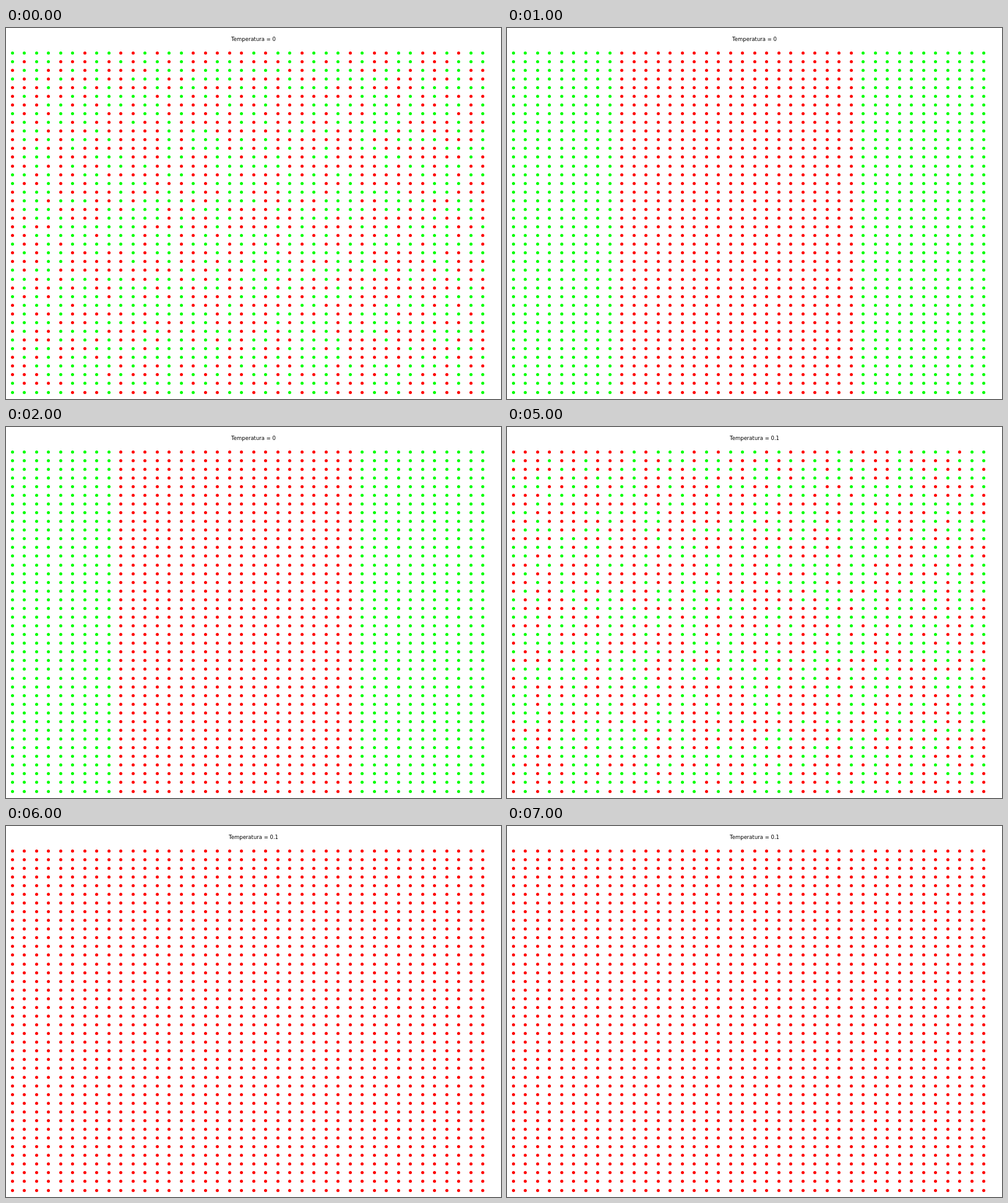
These frames come from a looping animation (800 px wide and 600 px high, 8 s). An HTML page with a canvas:

```html
<!DOCTYPE html>
<html lang="es">
<head>
<meta charset="utf-8">
<title>Temperatura</title>
<style>
  html, body { margin: 0; width: 100%; height: 100%; overflow: hidden; background: #fff; }
  canvas { display: block; }
</style>
</head>
<body>
<canvas id="stage" width="800" height="600"></canvas>
<script>
const ctx = document.getElementById('stage').getContext('2d');
const SIZE = 40, LOOP = 8000;
const RED = '#f00', GREEN = '#0f0';

function seededRandom(seed) {
  return () => {
    seed = (seed + 0x6D2B79F5) | 0;
    let t = Math.imul(seed ^ (seed >>> 15), 1 | seed);
    t = (t + Math.imul(t ^ (t >>> 7), 61 | t)) ^ t;
    return ((t ^ (t >>> 14)) >>> 0) / 4294967296;
  };
}

function randomSpins(seed) {
  const random = seededRandom(seed);
  const spins = Array.from({ length: SIZE * SIZE }, () => random() < 0.5);
  return (col, row) => spins[row * SIZE + col];
}

// Each spin function returns true for red
const phases = [
  { start: 0, temperature: '0', isRed: randomSpins(11) },
  { start: 1000, temperature: '0', isRed: col => col >= 9 && col <= 28 },
  { start: 5000, temperature: '0.1', isRed: randomSpins(29) },
  { start: 6000, temperature: '0.1', isRed: () => true }
];

function draw({ temperature, isRed }) {
  ctx.fillStyle = '#fff';
  ctx.fillRect(0, 0, 800, 600);
  ctx.fillStyle = '#000';
  ctx.font = '8.5px "DejaVu Sans", sans-serif';
  ctx.textAlign = 'center';
  ctx.fillText('Temperatura = ' + temperature, 400, 21);

  for (let row = 0; row < SIZE; row++) {
    const y = 40.5 + Math.floor(row * 549 / 39);
    for (let col = 0; col < SIZE; col++) {
      const x = 10.5 + Math.round(col * 760 / 39);
      ctx.fillStyle = isRed(col, row) ? RED : GREEN;
      ctx.beginPath();
      ctx.arc(x, y, 2.5, 0, 2 * Math.PI);
      ctx.fill();
    }
  }
}

let shown;
function tick() {
  const time = performance.now() % LOOP;
  const phase = phases.findLast(p => time >= p.start);
  if (phase !== shown) draw(shown = phase);
  requestAnimationFrame(tick);
}
tick();
</script>
</body>
</html>
```
